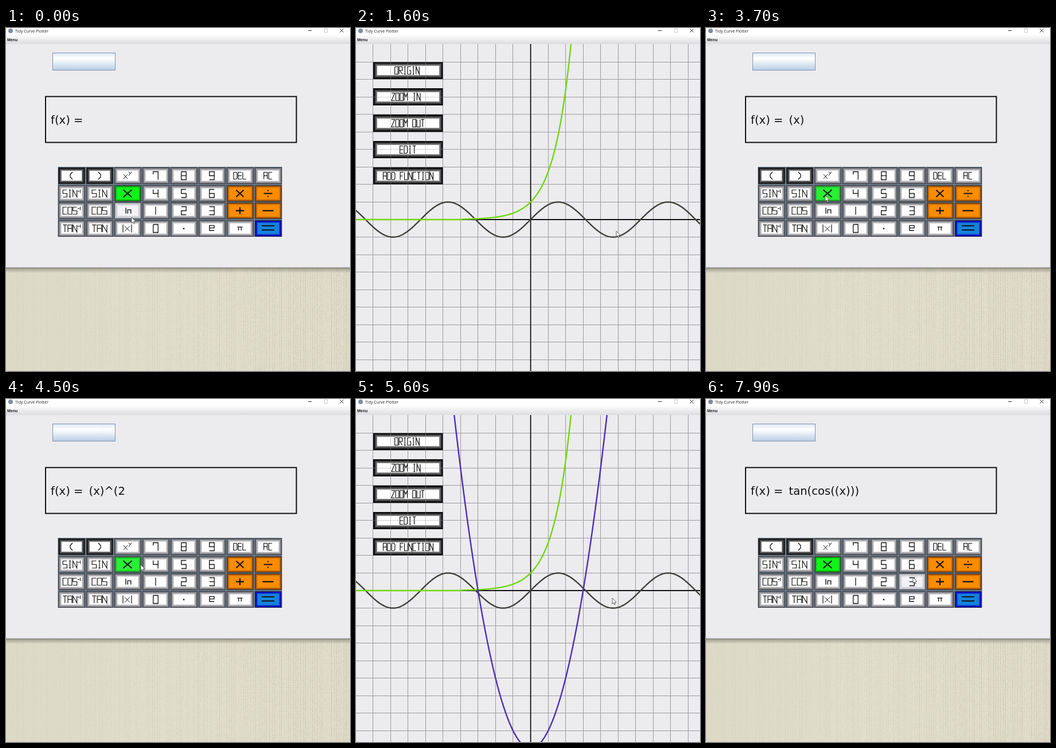
Animation, 600 px wide and 598 px high, one loop 8 s. Source, as an HTML page with a canvas:

```html
<!DOCTYPE html>
<html lang="en">
<head>
<meta charset="utf-8">
<title>Graphing calculator</title>
<style>
html, body { margin: 0; height: 100%; overflow: hidden; background: #ecebee; }
canvas { display: block; width: 100vw; height: 100vh; }
</style>
</head>
<body>
<canvas id="stage" width="600" height="598"></canvas>
<script>
const W = 600, H = 598, LOOP = 8000, TICK = 100;
const ctx = document.getElementById('stage').getContext('2d');

// [start, typed expression]; null shows the graph
const scenes = [
  [0, ''], [300, 'e'], [700, 'e^('], [900, 'e^((x)'], [1100, 'e^((x))'], [1500, null],
  [2900, ''], [3600, '(x)'], [4000, '(x)^('], [4300, '(x)^(2'], [4700, '(x)^(2)'],
  [5000, '(x)^(2)-'], [5200, '(x)^(2)-9'], [5600, null],
  [6300, ''], [6700, 'tan('], [7000, 'tan(cos('], [7300, 'tan(cos((x)'],
  [7500, 'tan(cos((x))'], [7700, 'tan(cos((x)))']
];

// [time, x, y] of the pointer tip
const path = [
  [0, 219, 330], [300, 352, 346], [400, 352, 346], [700, 208, 262], [800, 208, 290],
  [900, 208, 290], [1100, 160, 258], [1200, 160, 258], [1400, 454, 354], [1800, 454, 354],
  [2300, 150, 262], [2500, 88, 240], [2600, 90, 262], [2900, 90, 262], [3500, 208, 292],
  [3700, 208, 292], [4000, 208, 262], [4300, 308, 320], [4400, 308, 320], [4600, 162, 258],
  [4700, 162, 258], [5000, 455, 318], [5100, 455, 318], [5200, 358, 258], [5400, 447, 347],
  [5700, 447, 347], [6100, 90, 260], [6300, 90, 260], [6600, 158, 350], [6700, 158, 350],
  [6900, 170, 323], [7000, 170, 323], [7200, 208, 292], [7300, 208, 292], [7400, 162, 258],
  [7700, 162, 258], [7900, 361, 311], [8000, 361, 311]
];

// Stroke lettering on a 4 by 6 lattice, two digits per point
const glyphs = {
  0: '0040460600', 1: '2026', 2: '004043030646', 3: '00404606 0343', 4: '000343 4046',
  5: '400003434606', 6: '400006464303', 7: '02004046', 8: '0040460600 0343', 9: '430300404606',
  A: '06004046 0343', C: '40000646', D: '00304145360600', E: '40000646 0343', F: '400006 0333',
  G: '400006464323', I: '1030 2026 1636', L: '000646', M: '0600234046', N: '06004640',
  O: '0040460600', R: '0600404303 1346', S: '400003434606', T: '0040 2026', U: '00064640',
  Z: '00400646', '(': '30121436', ')': '10323416', x: '0046 4006', y: '0023 4006',
  l: '2026', n: '06024246', e: '04444202064646', p: '0242 1216 3236', '|': '2026',
  '-': '0343', '+': '0343 2026', '/': '0343 2021 2526', '=': '0141 0545', '.': '2324'
};

const rims = {
  plain: ['#3a3f46', '#707074', '#8c8c90', '#a3a3a7', '#bcbcc0', '#dadadd', '#fff'],
  dark: ['#30343a', '#121212', '#2c2c2c', '#454545', '#5e5e5e', '#888', '#fff'],
  orange: ['#3a3f46', '#7a4208', '#b05c00', '#d07000', '#e88000', '#fa8c00'],
  green: ['#3a3f46', '#1c6a20', '#0ca012', '#0cc814', '#10e816', '#10f418'],
  blue: ['#2a3050', '#0808a0', '#0a0cc0', '#0c28cc', '#0f55d4', '#1482dc'],
  menu: ['#0c0c0c', '#101010', '#1c1c1c', '#3a3a3a', '#555', '#6c6c6c', '#8c8c8c', '#fff']
};

const keys = [
  ['(', ')', 'xy', '7', '8', '9', 'DEL', 'AC'],
  ['SIN*', 'SIN', 'X', '4', '5', '6', 'x', '/'],
  ['COS*', 'COS', 'ln', '1', '2', '3', '+', '-'],
  ['TAN*', 'TAN', '|x|', '0', '.', 'e', 'p', '=']
];
const kinds = { '(': 'dark', ')': 'dark', X: 'green', x: 'orange', '/': 'orange', '+': 'orange', '-': 'orange', '=': 'blue' };

// label: width, height, pitch, line weight, vertical shift
const sizes = {
  X: [15, 13, 0, 2, 0], x: [13, 12, 0, 2, 0], '/': [15, 12, 0, 2, 0], '+': [14, 12, 0, 2.2, 0],
  '-': [19, 12, 0, 2.2, 0], '=': [22, 11, 0, 2, -1], '.': [2, 14, 0, 2.5, -1],
  p: [9, 9, 0, 1.3, -1], e: [8, 13, 0, 1.4, -3], DEL: [6, 12, 8, 1.2, 0], AC: [6, 12, 8.5, 1.2, 0],
  ln: [5.5, 10, 6, 1.4, 0], '(': [8, 13, 0, 1.3, 0], ')': [8, 13, 0, 1.3, 0]
};

const menu = ['ORIGIN', 'ZOOM IN', 'ZOOM OUT', 'EDIT', 'ADD FUNCTION'];
const unit = 30.55, ox = 304.5, oy = 334;

function rect(x, y, w, h, fill) {
  ctx.fillStyle = fill;
  ctx.fillRect(x, y, w, h);
}

function line(points, color, width) {
  ctx.strokeStyle = color;
  ctx.lineWidth = width;
  ctx.beginPath();
  points.forEach(([x, y]) => ctx.lineTo(x, y));
  ctx.stroke();
}

function text(str, x, y, font, color = '#000') {
  ctx.font = font;
  ctx.fillStyle = color;
  ctx.fillText(str, x, y);
}

function fade(y0, y1, stops) {
  const g = ctx.createLinearGradient(0, y0, 0, y1);
  stops.forEach(([at, c]) => g.addColorStop(at, c));
  return g;
}

function letters(str, cx, cy, w, h, pitch, weight) {
  const left = cx - (pitch * (str.length - 1) + w) / 2;
  [...str].forEach((ch, i) => {
    if (ch === ' ') return;
    for (const stroke of glyphs[ch].split(' ')) {
      const pts = stroke.match(/../g).map(([x, y]) =>
        [left + i * pitch + x * w / 4, cy - h / 2 + y * h / 6]);
      line(pts, '#111', weight);
    }
  });
}

function bevel(x, y, w, h, colors) {
  colors.forEach((c, i) => rect(x + i, y + i, w - 2 * i, h - 2 * i, c));
}

function inside([px, py], x, y, w, h) {
  return px >= x && px < x + w && py >= y && py < y + h;
}

function label(name, cx, cy) {
  if (name === 'xy') {
    letters('x', cx - 3.5, cy + 1.5, 7.5, 8, 0, 1);
    letters('y', cx + 4.5, cy - 3.5, 5, 7, 0, 1);
  } else if (name === '|x|') {
    letters('||', cx - .5, cy, 1, 14, 15, 1.2);
    letters('x', cx - .5, cy + .5, 9, 9, 0, 1);
  } else if (name.endsWith('*')) {
    letters(name.slice(0, 3), cx - 2.5, cy, 7, 12.5, 8.7, 1.2);
    letters('-', cx + 12.5, cy - 4, 3, 4, 0, 1);
    letters('1', cx + 15.5, cy - 4, 2, 6, 0, 1.1);
  } else {
    const [w, h, pitch, weight, dy] = sizes[name] ||
      (name.length > 1 ? [7.5, 12.5, 9.2, 1.2, 0] : [8.5, 14, 0, 1.3, 0]);
    letters(name === 'X' ? 'x' : name, cx, cy + dy, w, h, pitch, weight);
  }
}

// Woven cloth: plain on the left, with a coarser weave to the right
function makeLinen() {
  const c = document.createElement('canvas');
  c.width = W;
  c.height = H - 418;
  const g = c.getContext('2d');
  let seed = 7;
  const rnd = () => (seed = seed * 16807 % 2147483647) / 2147483647;
  const base = g.createLinearGradient(0, 0, W, 0);
  base.addColorStop(0, '#dddac8');
  base.addColorStop(.45, '#e2dfcd');
  base.addColorStop(1, '#e0ddca');
  g.fillStyle = base;
  g.fillRect(0, 0, W, c.height);
  for (let x = 0; x < W; x += 3) {
    const depth = .06 + .16 * x / W, column = rnd();
    for (let y = 0; y < c.height; y += 3) {
      g.fillStyle = `rgba(120,115,88,${depth * (column + rnd())})`;
      g.fillRect(x, y, 1, 2);
    }
  }
  return c;
}
const linen = makeLinen();

function drawChrome() {
  rect(0, 0, W, 11, '#fff');
  rect(0, 11, W, 17, fade(11, 28, [[0, '#fff'], [1, '#dcdcdf']]));
  ctx.fillStyle = '#7d8ca3';
  ctx.beginPath();
  ctx.arc(8, 5, 4, 0, 7);
  ctx.fill();
  text('Tidy Curve Plotter', 16, 7.5, '7px "Open Sans", sans-serif', '#222');
  text('Menu', 2, 23, 'bold 7px "Liberation Sans", sans-serif', '#222');
  line([[527, 4.5], [533, 4.5]], '#222', 1);
  ctx.strokeStyle = '#ccc';
  ctx.strokeRect(555.5, 1.5, 5, 6);
  line([[582.5, 1.5], [588.5, 7.5]], '#222', 1);
  line([[588.5, 1.5], [582.5, 7.5]], '#222', 1);
}

function drawCalculator(expr, tip) {
  ctx.drawImage(linen, 0, 418);
  rect(0, 418, W, 9, fade(418, 427, [[0, 'rgba(60,58,48,.4)'], [1, 'rgba(60,58,48,0)']]));
  rect(0, 417.5, W, 1, '#777');

  rect(81, 43, 110, 31, '#8292b0');
  rect(82, 44, 108, 29, fade(44, 73, [[0, '#dde8f3'], [.3, '#fff'], [.5, '#eef3f8'], [1, '#b8cfe5']]));
  ctx.strokeStyle = '#111';
  ctx.lineWidth = 2;
  ctx.strokeRect(69, 119.5, 437.5, 80);
  const font = '19.6px "DejaVu Sans", Verdana, sans-serif';
  text('f(x) =', 78, 167, font, '#111');
  text(expr, 144.5, 167, font, '#111');

  rect(90.5, 242, 391, 122, '#6c7a8a');
  keys.forEach((row, r) => row.forEach((name, c) => {
    const x = 91 + c * 49, y = Math.round(243 + r * 30.6), w = 47, h = 29;
    const kind = kinds[name] || 'plain';
    bevel(x, y, w, h, rims[kind]);
    if (inside(tip, x, y, w, h)) {
      const strong = kind === 'plain' || kind === 'dark';
      rect(x + 1, y + 1, w - 2, h - 2, strong ? 'rgba(234,234,242,.6)' : 'rgba(190,205,225,.14)');
    }
    label(name, x + w / 2 - .5, y + h / 2);
  }));
}

function drawGrid(color) {
  for (let i = -9; i < 10; i++) {
    const x = Math.floor(ox + i * unit), y = Math.floor(oy + i * unit);
    rect(x, 28, 1, H, color);
    rect(0, y, W, 1, color);
  }
}

function plot(fn, color) {
  const pts = [];
  for (let x = -1; x <= W + 1; x++) pts.push([x, oy - unit * fn((x - ox) / unit)]);
  line(pts, color, 2.4);
}

function drawGraph(t, tip) {
  drawGrid('#9b9b9d');
  menu.forEach((name, i) => {
    const y = 59 + i * 46;
    bevel(30, y, 122, 30, rims.menu);
    if (inside(tip, 30, y, 122, 30)) rect(31, y + 1, 120, 28, 'rgba(234,234,242,.5)');
    letters(name, i === 4 ? 91 : i === 0 ? 89 : i === 1 ? 87 : 90.5, y + 15, 5.6, 13, 7.4, 1.2);
  });
  ctx.save();
  ctx.beginPath();
  ctx.rect(30, 59, 122, 214);
  ctx.clip();
  drawGrid('rgba(150,150,154,.45)');
  ctx.restore();

  ctx.save();
  ctx.beginPath();
  ctx.rect(0, 28, W, H);
  ctx.clip();
  rect(303.7, 28, 1.8, H, '#111');
  rect(0, 333, W, 2, '#111');
  plot(Math.sin, '#40403a');
  plot(x => Math.exp(x) < .02 ? 0 : Math.exp(x), '#70d80c');
  if (t >= 5600) plot(x => x * x - 9, '#4a2fb6');
  ctx.restore();
}

function pointer(t) {
  const i = path.findIndex(p => p[0] > t);
  const [t0, x0, y0] = path[i - 1], [t1, x1, y1] = path[i];
  const k = (t - t0) / (t1 - t0), e = k * k * (3 - 2 * k);
  return [x0 + (x1 - x0) * e, y0 + (y1 - y0) * e];
}

function drawPointer([x, y]) {
  ctx.beginPath();
  [[0, 0], [0, 10], [2.2, 8], [3.8, 11.6], [5.4, 10.9], [3.9, 7.4], [7, 7.2]]
    .forEach(([dx, dy]) => ctx.lineTo(x + dx, y + dy));
  ctx.closePath();
  ctx.fillStyle = '#fff';
  ctx.fill();
  ctx.strokeStyle = '#555';
  ctx.lineWidth = .9;
  ctx.stroke();
}

function draw(t) {
  const expr = scenes.filter(s => s[0] <= t).pop()[1];
  const tip = pointer(t);
  rect(0, 0, W, H, '#ecebee');
  if (expr === null) drawGraph(t, tip);
  else drawCalculator(expr, tip);
  drawChrome();
  drawPointer(tip);
}

let start = null, last = -1;
function loop(now) {
  if (start === null) start = now;
  const t = Math.floor((now - start) % LOOP / TICK) * TICK;
  if (t !== last) draw(last = t);
  requestAnimationFrame(loop);
}
draw(0);
requestAnimationFrame(loop);
</script>
</body>
</html>
```
